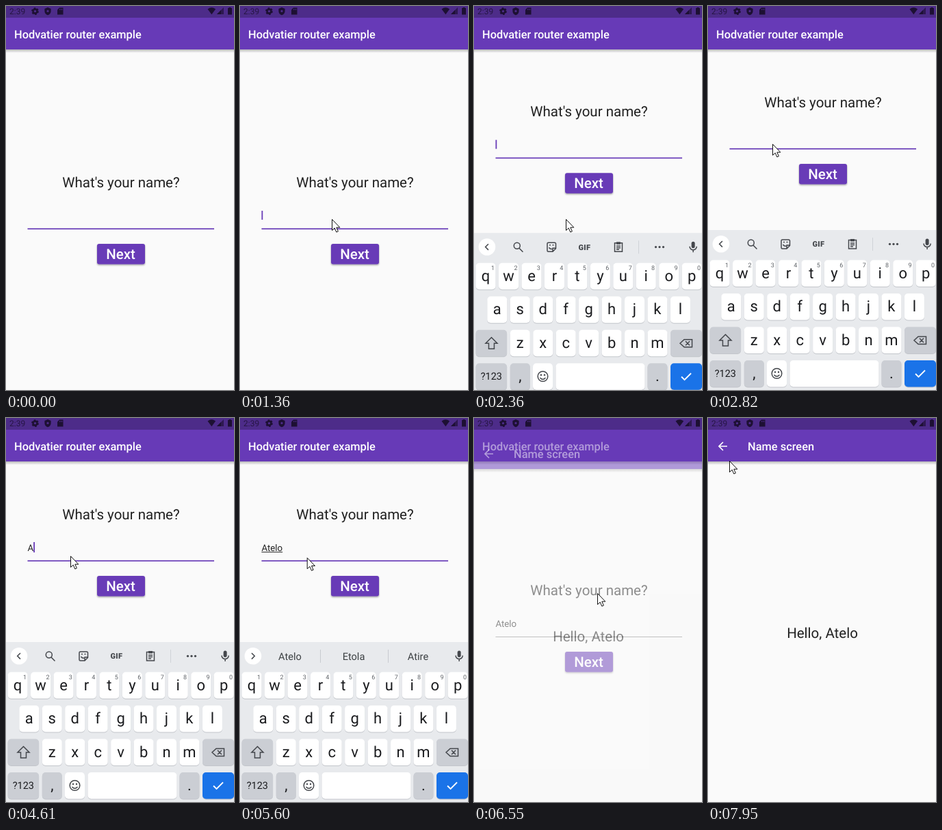
Recreate the animation shown at these times as an HTML page. Size 333x557 px, loop 8 s.

```html
<!DOCTYPE html>
<html lang="en">
<head>
<meta charset="utf-8">
<title>Router demo</title>
<style>
  html, body { margin: 0; width: 100%; height: 100%; overflow: hidden; background: #fafafa; }
  svg { display: block; width: 333px; height: 557px; }
  text { font-family: Roboto, sans-serif; text-rendering: geometricPrecision; white-space: pre; }
  .bar { font-size: 16.4px; font-weight: 500; fill: #fff; }
  .big { font-size: 20.5px; fill: #212121; text-anchor: middle; }
  .mid { text-anchor: middle; }
  .key { font-size: 22px; fill: #1b1c1f; text-anchor: middle; }
  .hint { font-size: 9px; fill: #5f6368; text-anchor: middle; }
  .word { font-size: 14.6px; fill: #3c4043; text-anchor: middle; }
  .line { fill: none; stroke: #44474c; stroke-width: 1.5; }
</style>
</head>
<body>
<svg viewBox="0 0 333 557">
  <defs>
    <linearGradient id="shade" x2="0" y2="1">
      <stop stop-opacity=".26"/><stop offset="1" stop-opacity="0"/>
    </linearGradient>
    <clipPath id="btnClip"><rect x="133" y="345" width="70" height="29.5" rx="3"/></clipPath>
    <filter id="drop" x="-10%" y="-20%" width="120%" height="150%">
      <feDropShadow dx="0" dy="1.3" stdDeviation="1.1" flood-opacity=".4"/>
    </filter>
  </defs>

  <rect width="333" height="557" fill="#fafafa"/>
  <rect y="63" width="333" height="5" fill="url(#shade)"/>
  <rect width="333" height="63" fill="#673ab7"/>
  <text class="bar" x="12" y="46.6">Hodvatier router example</text>

  <g id="form">
    <text class="big" x="168" y="262.5">What's your name?</text>
    <text id="entry" x="31.4" y="308.5" font-size="13.3" fill="#212121"></text>
    <rect id="compose" x="31.4" y="310" height="1" fill="#333"/>
    <rect id="caret" y="297" width="1.8" height="13" fill="#673ab7"/>
    <rect id="rule" x="31.5" width="272.5"/>
    <rect x="133" y="345" width="70" height="29.5" rx="3" fill="#673ab7" filter="url(#drop)"/>
    <circle id="ripple" cx="179" cy="367" fill="#fff" fill-opacity=".2" clip-path="url(#btnClip)"/>
    <text class="mid" x="167.5" y="366.8" font-size="20.5" font-weight="500" fill="#fff">Next</text>
  </g>

  <g id="page">
    <rect width="333" height="557" fill="#fafafa"/>
    <rect y="63" width="333" height="5" fill="url(#shade)"/>
    <rect width="333" height="63" fill="#673ab7"/>
    <path d="M28 41H16.5M22 35l-6 6 6 6" fill="none" stroke="#fff" stroke-width="1.7"/>
    <text class="bar" x="58" y="46.6">Name screen</text>
    <text id="hello" class="big" x="167" y="318.5">Hello, Atelo</text>
  </g>

  <g fill="#1d1033">
    <rect width="333" height="17" fill="#000" fill-opacity=".25"/>
    <text x="5" y="12" font-size="12" fill-opacity=".8">2:39</text>
    <circle cx="42.5" cy="7.6" r="3" fill="none" stroke="#1d1033" stroke-width="2.6"/>
    <circle cx="42.5" cy="7.6" r="4.5" fill="none" stroke="#1d1033" stroke-width="1.8" stroke-dasharray="2.4 2.31"/>
    <path d="M61 2l4.6 2v3.4c0 2.800-2 5-4.600 5.800-2.600-.8-4.600-3-4.600-5.800V4z"/>
    <circle cx="61" cy="7.400" r="1.600" fill="#4d2b89"/>
    <path d="M78 2.500h5.500v10H75v-7z"/>
    <path d="M78.500 4v2M80.300 4v2M82 4v2" stroke="#4d2b89" stroke-width=".8"/>
    <path d="M294.500 4.600q5.800-4.600 11.600 0l-5.800 7.600z"/>
    <path d="M318 2v10h-10z" fill-opacity=".65"/><path d="M314 6v6h-6z"/>
    <path d="M324 3h1.500V2h3v1h1.500v9.500h-6z"/>
  </g>

  <g id="board">
    <rect y="325" width="333" height="232" fill="#e8eaed"/>
    <circle cx="19" cy="345.300" r="12.300" fill="#fff"/>
    <path id="chevron" class="line"/>
    <g id="tools">
      <circle cx="62.800" cy="343.500" r="4.500" class="line"/>
      <path d="M66 347l5.500 5.500" class="line"/>
      <path d="M108.500 339h9.500a1.500 1.500 0 0 1 1.500 1.500v7l-4.500 4.500h-6.500a1.500 1.500 0 0 1-1.500-1.500v-10a1.500 1.500 0 0 1 1.500-1.500zM119 347h-4v5M109.500 346q2 3 4.500 2" class="line" stroke-width="1.300"/>
      <path d="M110 342.500h2M114.500 342.500h2" class="line"/>
      <text class="mid" x="161.500" y="349.300" font-size="11" font-weight="900" letter-spacing=".4" fill="#44474c">GIF</text>
      <path d="M205.500 339.500h11v12.500h-11zM208 344h6M208 346.500h6M208 349h4" class="line" stroke-width="1.300"/>
      <path d="M208 338h6v3.500h-6z" fill="#44474c"/>
      <path d="M240.500 336v19" stroke="#d0d3d8"/>
      <g fill="#44474c"><circle cx="265.500" cy="345.300" r="1.600"/><circle cx="271" cy="345.300" r="1.600"/><circle cx="276.500" cy="345.300" r="1.600"/></g>
    </g>
    <g id="words">
      <path d="M117.500 336v19M216.500 336v19" stroke="#c8cbd0"/>
      <text class="word" x="73" y="351"></text>
      <text class="word" x="166" y="351"></text>
      <text class="word" x="260" y="351"></text>
    </g>
    <rect x="317.600" y="337.500" width="5" height="9.500" rx="2.500" fill="#44474c"/>
    <path d="M315 344.500a5.100 5.100 0 0 0 10.200 0M320.100 349.600v3.400" class="line"/>
    <g id="keys"></g>
    <path d="M25.500 476.500l8.500 8.500h-4.500v8h-8v-8H17z" class="line"/>
    <path d="M307 479.500h11.500v11H307l-6-5.500zM309 482l6 6M315 482l-6 6" class="line" stroke-width="1.400"/>
    <circle cx="100.500" cy="533" r="7.300" class="line"/>
    <circle cx="98" cy="531" r="1.200" fill="#44474c"/><circle cx="103" cy="531" r="1.200" fill="#44474c"/>
    <path d="M96.500 535q4 4.500 8 0" class="line"/>
    <path d="M303 533.500l4.500 4.500 9.500-9.500" fill="none" stroke="#fff" stroke-width="1.800"/>
  </g>

  <path id="mouse" d="M.5.5v16l3.700-3.400 2.600 5.900 2.600-1.100-2.600-5.700h5z" fill="#fff" stroke="#111" stroke-linejoin="round"/>
</svg>

<script>
const LOOP = 8000;
const $ = id => document.getElementById(id);
const set = (el, attrs) => { for (const k in attrs) el.setAttribute(k, attrs[k]); };
const show = (el, on) => { el.style.display = on ? '' : 'none'; };
const shift = (el, x, y) => el.setAttribute('transform', `translate(${x} ${y})`);
const clamp = (v, lo, hi) => Math.min(hi, Math.max(lo, v));
const smooth = p => p * p * (3 - 2 * p);
const mix = (a, b, p) => a + (b - a) * p;

// Progress from 0 to 1 in n even jumps, the first at a and the last at b
const steps = (t, a, b, n) =>
  clamp(Math.floor((t - a) / (b - a) * (n - 1) + 0.01) + 1, 0, n) / n;
// Latest value of a [time, value] list
const latest = (list, t) => list.reduce((v, [at, next]) => t >= at ? next : v, null);

function buildKeys() {
  let out = '';
  const key = (x, y, w, label = '', fill = '#fff', size = 22) => {
    out += `<rect x="${x}" y="${y + 1}" width="${w}" height="38.500" rx="5" fill="#c3c6cb"/>` +
      `<rect x="${x}" y="${y}" width="${w}" height="38.500" rx="5" fill="${fill}"/>` +
      `<text class="key" x="${x + w / 2}" y="${y + (size < 20 ? 24 : 26)}" style="font-size:${size}px">${label}</text>`;
  };
  const row = (letters, x, y) => [...letters].forEach((c, i) => key(x + 33.45 * i, y, 29, c));
  const grey = '#cbced4';
  row('qwertyuiop', 2.6, 368.5);
  [...'1234567890'].forEach((d, i) => {
    out += `<text class="hint" x="${27.5 + 33.45 * i}" y="379">${d}</text>`;
  });
  row('asdfghjkl', 19.3, 417);
  row('zxcvbnm', 52.8, 465.5);
  key(2.6, 465.5, 45.5, '', grey);
  key(287, 465.5, 46, '', grey);
  key(2.6, 514, 45.5, '?123', grey, 14.5);
  key(52.8, 514, 29, ',', grey);
  key(86, 514, 29);
  key(119.5, 514, 130);
  key(253.5, 514, 29, '.', grey);
  key(287, 514, 46, '', '#1a73e8');
  $('keys').innerHTML = out;
}

const typed = [[0, ''], [4610, 'A'], [4770, 'At'], [4920, 'Ate'], [5000, 'Atel'], [5070, 'Atelo']];
const hints = [
  [4690, ['A', 'And', 'At']], [4920, ['Ate', 'Are', 'Date']], [5070, ['Atel', 'Later', 'Atlas']],
  [5220, null], [5370, ['Atelo', 'Etola', 'Atire']]
];
const blinks = [[210, 670], [1210, 1670], [2200, 2670], [3140, 3690], [4150, 5600], [6060, 6470]];
const moves = [
  [670, 1060, 6, 134, 309], [2430, 2820, 6, 94, 200],
  [5600, 6170, 8, 180, 254], [7390, 7950, 8, 31, 62]
];
// Leaving the form: time, lift of content, keyboard drop, page offset, page opacity
const leave = [
  [6470, [60, 130, 67, 0.2]], [6550, [6, 232, 11, 0.5]], [6630, [0, 232, 0, 1]]
];

function drawForm(t, lift, leaving) {
  shift($('form'), 0, -lift);
  const text = latest(typed, t);
  const entry = $('entry');
  if (entry.textContent !== text) entry.textContent = text;
  const width = text ? entry.getComputedTextLength() : 0;
  set($('compose'), { width });
  show($('compose'), text.length > 1 && !leaving);
  set($('caret'), {
    x: 31.5 + width, y: text ? 296 : 297, height: text ? 15 : 13
  });
  show($('caret'), blinks.some(([on, off]) => t >= on && t < off));
  set($('rule'), leaving
    ? { y: 323, height: 1, fill: '#8a8a8a' }
    : { y: 322.4, height: 1.7, fill: '#673ab7' });
  set($('ripple'), { r: leaving ? 0 : 13 * steps(t, 6250, 6400, 3) });
}

function drawBoard(t, drop) {
  show($('board'), drop < 232);
  shift($('board'), 0, drop);
  const words = latest(hints, t);
  show($('tools'), !words);
  show($('words'), words);
  set($('chevron'), { d: words ? 'M17 341l4.300 4.300-4.300 4.300' : 'M21 341l-4.300 4.300 4.300 4.300' });
  if (words) $('words').querySelectorAll('text').forEach((el, i) => { el.textContent = words[i]; });
}

function drawMouse(t) {
  let x = 271, y = 558;
  for (const [a, b, n, toX, toY] of moves) {
    const p = smooth(steps(t, a, b, n));
    x = mix(x, toX, p);
    y = mix(y, toY, p);
  }
  show($('mouse'), t >= 670);
  shift($('mouse'), x, y);
}

function draw(t) {
  const leaving = latest(leave, t);
  let lift = 0, drop = 232, offset = 0, alpha = 0;
  if (leaving) {
    [lift, drop, offset, alpha] = leaving;
  } else if (t >= 2200) {
    const p = clamp(Math.floor((t - 2200) / 77.5 + 0.01) / 4, 0, 1);
    lift = mix(116, 10, (1 - p) ** 3);
    drop = 68 * (1 - p) ** 4;
  }
  drawForm(t, lift, leaving);
  show($('page'), alpha);
  $('page').style.opacity = alpha;
  shift($('page'), 0, offset);
  shift($('hello'), 0, -lift);
  drawBoard(t, drop);
  drawMouse(t);
}

function tick() {
  draw(performance.now() % LOOP);
  requestAnimationFrame(tick);
}

buildKeys();
tick();
</script>
</body>
</html>
```
